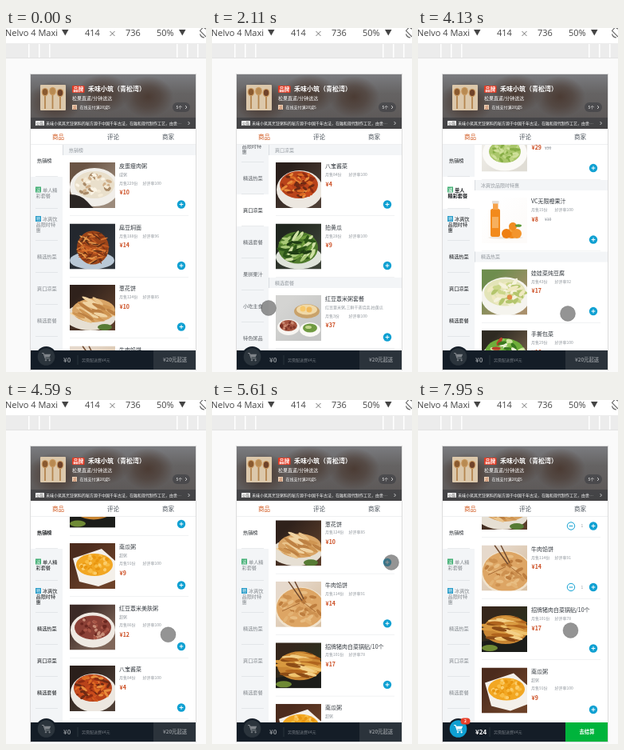
Write an HTML page that moves like this. It is 251 px wide and 430 px high and loops after 8000 ms.

```html
<!DOCTYPE html>
<html>
<head>
<meta charset="utf-8">
<style>
html, body { margin: 0; width: 100%; height: 100%; overflow: hidden; background: #fafafa; }
svg { display: block; width: 251px; height: 430px; }
text { font-family: "Noto Sans CJK SC", "Noto Sans CJK", "Noto Sans", sans-serif; white-space: pre; }
.ui { font-family: "Open Sans", sans-serif; }
</style>
</head>
<body>
<svg id="stage" viewBox="0 0 251 430" xmlns="http://www.w3.org/2000/svg"></svg>
<script>
const LOOP = 8000, TOP = 146, HEAD = 13, ROW = 76.5, SIDE = 40;
const BLUE = '#0fa0d2';
const $ = id => document.getElementById(id);

// ---------- drawing helpers ----------
const text = (x, y, s, size, fill, more = '') =>
  `<text x="${x}" y="${y + size * 0.36}" font-size="${size}" fill="${fill}" ${more}>${s}</text>`;
const rect = (x, y, w, h, fill, more = '') =>
  `<rect x="${x}" y="${y}" width="${w}" height="${h}" fill="${fill}" ${more}/>`;
const circle = (x, y, r, fill, more = '') =>
  `<circle cx="${x}" cy="${y}" r="${r}" fill="${fill}" ${more}/>`;
const oval = ([x, y, rx, ry, fill], more = '') =>
  `<ellipse cx="${x}" cy="${y}" rx="${rx}" ry="${ry}" fill="${fill}" ${more}/>`;
const shape = (d, fill) => `<path d="${d}" fill="${fill}"/>`;
const path = (d, stroke, w, more = '') =>
  `<path d="${d}" fill="none" stroke="${stroke}" stroke-width="${w}" ${more}/>`;
const BOLD = 'font-weight="700"', MID = 'text-anchor="middle"';

function random(seed) {
  return () => {
    seed = (seed * 16807) % 2147483647;
    return seed / 2147483647;
  };
}

// ---------- dishes: backdrop, base (plate), heap, pieces, details on top ----------
const foods = {
  congee: { bg: ['#6a5444', '#9c8b7c'], base: oval([31, 31, 31, 24, '#f1eee9']), heap: [31, 28, 25, 17, '#e9dfcb'],
    bits: ['#cfae88', '#fbf4e6', '#a98a68', '#f4ead6'], n: 34, w: 4, h: 1.8,
    extra: shape('M0 40Q14 40 22 49T30 57H0Z', '#2c2624') },
  noodle: { bg: ['#23272e', '#30363d'], base: oval([28, 46, 28, 11, '#b9c8d6']), heap: [29, 30, 20, 21, '#9c4519'],
    bits: ['#d9742f', '#7f3214', '#e79a4c', '#5d2d17', '#c25a22'], n: 90, w: 7, h: 0.9 },
  pancake: { bg: ['#2f211b', '#5a3d2a'], base: oval([26, 40, 32, 17, '#e6dfd3']) + oval([44, 53, 9, 4, '#577b34']),
    heap: [30, 32, 27, 15, '#d9a566'], bits: ['#eac48c', '#cf9552', '#f0d3a2', '#bd8143'],
    n: 30, w: 13, h: 2.2, tilt: [22, 30] },
  pie: { bg: ['#e6d9cc', '#d9c2a6'], base: oval([31, 34, 32, 27, '#f0e2cc']), heap: [31, 33, 30, 25, '#dda564'],
    bits: ['#cd9150', '#e8bd82', '#bd7d3e', '#e3b273'], n: 44, w: 5, h: 2,
    extra: path('M16 0L33 24M24 0L35 22', '#6f4a30', 1.5) + path('M32 24l18 14M30 27l-22 10', '#a96c35', 1) },
  dumpling: { bg: ['#35261b', '#2a3320'], base: shape('M0 44L57 36V57H0Z', '#1c1d1a') + oval([10, 52, 10, 4, '#6f8a35']),
    heap: [30, 29, 28, 18, '#c98633'], bits: ['#efc36c', '#b0641d', '#f3d088', '#d99a40', '#8c4c16'],
    n: 40, w: 15, h: 2.2, tilt: [8, 24] },
  pumpkin: { bg: ['#4b2b1d', '#6d4229'], base: shape('M4 19L40 7 57 22V46L36 54 12 48Z', '#f4f0ea'),
    heap: [31, 27, 23, 14, '#f2a723'], bits: ['#f9bd45', '#e9960f', '#fbcd6c'], n: 40, w: 3, h: 2 },
  redbean: { bg: ['#3b2a26', '#80675a'], base: oval([29, 32, 28, 22, '#efe9e2']), heap: [29, 29, 23, 15, '#8b4036'],
    bits: ['#6b2820', '#c98f7a', '#a85546'], n: 34, w: 3, h: 1.8 },
  pickle: { bg: ['#2a1f1b', '#4d3e35'], base: oval([30, 34, 29, 24, '#ece7e0']), heap: [29, 28, 24, 17, '#b9431a'],
    bits: ['#dd6a23', '#8e2c12', '#e98d3c', '#c94b1c', '#6e2a14'], n: 60, w: 5, h: 1.6 },
  cucumber: { bg: ['#20261f', '#3d4238'], base: oval([29, 42, 29, 15, '#dfe3da']), heap: [28, 30, 25, 20, '#4f7a2c'],
    bits: ['#2c5518', '#a9c978', '#6f9c3d', '#cfe0a4', '#1f3d14'], n: 56, w: 8, h: 1.9, tilt: [-30, 80] },
  cabbage: { bg: ['#6e8d4e', '#a9906c'], base: oval([30, 34, 31, 24, '#f5f4ee']), heap: [29, 29, 26, 17, '#e3e4b8'],
    bits: ['#cbd68a', '#f5f2dc', '#b3c56c', '#efe9c0'], n: 40, w: 8, h: 2.4,
    extra: circle(35, 35, 3.2, '#df8a45') },
  greens: { bg: ['#2e2a22', '#74604a'], base: oval([29, 36, 30, 22, '#f2f1ec']), heap: [29, 28, 25, 18, '#6fae3a'],
    bits: ['#4c9527', '#cfe3a0', '#8dc456', '#b8402a', '#eef3d6', '#3a7a20'], n: 48, w: 6, h: 2.2 },
  juice: { bg: ['#ffffff', '#fdfbf9'], base: oval([30, 50, 22, 1.6, '#efe6dc']), heap: [38, 45, 8, 6, '#f08a1c'],
    bits: ['#f59a2e', '#f7ad4d'], n: 5, w: 3, h: 2,
    extra: rect(11, 14, 12, 35, '#f28a1c', 'rx="2.5"') + rect(14, 6, 6.5, 9, '#f6a24a') + rect(13, 4, 8.5, 3.5, '#e5dfd8') +
      rect(13, 24, 8, 14, '#f7b05e') + circle(31, 45, 6, '#ee7f12') + circle(44, 45, 6, '#f3952d') +
      circle(39, 36, 5, '#f08c22') + oval([46, 35, 4, 1.8, '#5c9a3a']) },
  salad: { bg: ['#f0eee9', '#e0ddd5'], base: oval([29, 34, 28, 22, '#fbfaf7']), heap: [29, 32, 20, 14, '#a9c66a'],
    bits: ['#cfe09a', '#86ad45', '#bfd684'], n: 36, w: 4, h: 1.6 },
  set: { bg: ['#d4d4d2', '#c6c7c6'], base: oval([16, 40, 14, 10, '#f7f5f1']), heap: [16, 38, 11, 7, '#a5543f'],
    bits: ['#7d3326', '#c98870'], n: 14, w: 2.5, h: 1.6,
    extra: oval([39, 20, 16, 9, '#c9a26a']) + oval([39, 18, 13, 6.5, '#f0d9a8']) + circle(34, 17, 3.5, '#f7c86b') +
      circle(42, 18, 3.5, '#f2b95a') + oval([43, 43, 13, 9, '#faf9f5']) + oval([43, 41, 9, 5.5, '#6f9a41']) +
      oval([41, 40, 4, 2, '#c3d68c']) }
};

function photo(kind, seed) {
  const f = foods[kind], rnd = random(seed * 977 + 31);
  const [hx, hy, rx, ry] = f.heap, [lean, spread] = f.tilt || [0, 120];
  let out = rect(0, 0, 57, 57, `url(#bg-${kind})`) + f.base + oval(f.heap);
  for (let i = 0; i < f.n; i++) {
    const a = rnd() * 6.283, r = Math.sqrt(rnd()) * 0.86, turn = lean + (rnd() - 0.5) * spread;
    const x = hx + Math.cos(a) * r * rx, y = hy + Math.sin(a) * r * ry;
    out += oval([x, y, f.w * (0.6 + rnd() * 0.4), f.h, f.bits[i % f.bits.length]],
      `transform="rotate(${turn} ${x} ${y})"`);
  }
  return `<g clip-path="url(#thumb)"><g filter="url(#soft)">${out}${f.extra || ''}</g></g>`;
}

// ---------- menu: name, sold, rating, price, picture, note, old price ----------
const menu = [
  ['热销榜', [
    ['皮蛋瘦肉粥', 229, 100, 10, 'congee', '咸粥'],
    ['扁豆焖面', 188, 96, 14, 'noodle'],
    ['葱花饼', 124, 85, 10, 'pancake'],
    ['牛肉馅饼', 114, 91, 14, 'pie'],
    ['招牌猪肉白菜锅贴/10个', 101, 78, 17, 'dumpling'],
    ['南瓜粥', 91, 100, 9, 'pumpkin', '甜粥'],
    ['红豆薏米美肤粥', 86, 100, 12, 'redbean', '甜粥'],
    ['八宝酱菜', 84, 100, 4, 'pickle'],
    ['红枣山药糙米粥', 81, 91, 10, 'congee'],
    ['糊塌子', 80, 93, 10, 'pancake']]],
  ['单人精彩套餐', [['红枣山药粥套餐', 17, 100, 29, 'salad', '', 36]]],
  ['冰爽饮品限时特惠', [['VC无限橙果汁', 15, 100, 8, 'juice', '', 10]]],
  ['精选热菜', [
    ['娃娃菜炖豆腐', 43, 92, 17, 'cabbage'],
    ['手撕包菜', 29, 100, 16, 'greens'],
    ['香酥黄金鱼/3条', 15, 100, 11, 'dumpling']]],
  ['爽口凉菜', [['八宝酱菜', 84, 100, 4, 'pickle'], ['拍黄瓜', 28, 100, 9, 'cucumber']]],
  ['精选套餐', [
    ['红豆薏米粥套餐', 3, 100, 37, 'set', '红豆薏米粥,三鲜干蒸烧卖,拍黄瓜'],
    ['皮蛋瘦肉粥套餐', 12, 100, 31, 'set']]],
  ['果拼果汁', []], ['小吃主食', []], ['特色粥品', []]
];
const starts = [];
const picked = { 2: 6450, 3: 6935 };

function row(item, y, id) {
  const [name, sold, rate, price, kind, note, old] = item;
  const d = note ? 10.5 : 0, grey = '#93999f';
  let out = photo(kind, id + 3) + text(62, 4.7, name, 7, '#30363c');
  if (note) out += text(62, 15.3, note, 5, grey);
  out += text(62, 15.2 + d, `月售${sold}份`, 5, grey) + text(91.5, 15.2 + d, `好评率${rate}`, 5, grey) +
    text(62.5, 27.3 + d, '¥' + price, 7, '#cb4a1e', BOLD);
  if (old) out += text(79, 27.3 + d, '¥' + old, 5, grey, 'text-decoration="line-through"');
  if (picked[id]) out += `<g id="minus${id}">${circle(0, 0, 4.7, '#fff', `stroke="${BLUE}"`)}${path('M-2.4 0H2.4', BLUE, 1)}</g>` +
    text(126, 52.5, '1', 5, grey, `id="count${id}" ${MID}`);
  out += circle(140, 52.5, 5.2, BLUE) + path('M137.6 52.5h4.8M140 50.1v4.8', '#fff', 1);
  return `<g transform="translate(80 ${y})">${out}${rect(0, 66.5, 149, 0.5, '#e3e5e7')}</g>`;
}

function buildList() {
  let y = TOP, id = 0, out = '';
  for (const [title, items] of menu) {
    starts.push(y - TOP);
    out += rect(71, y, 167, HEAD, '#f3f5f7') + rect(71, y, 1, HEAD, '#d9dde1') + text(79, y + 6.5, title, 6, '#93999f');
    items.forEach((item, i) => out += row(item, y + HEAD + 9 + i * ROW, id++));
    y += HEAD + items.length * ROW;
  }
  return out;
}

function buildSide() {
  return menu.map(([name], i) => {
    const y = TOP + i * SIDE, c = y + SIDE / 2;
    let out = rect(31, y, 40, SIDE, '#fff', `id="hit${i}" opacity="0"`) + rect(37, y + SIDE - 0.5, 28, 0.5, '#d3d7db');
    if (i === 1 || i === 2) {
      const lines = i === 1 ? ['单人精', '彩套餐'] : ['冰爽饮', '品限时特', '惠'];
      const first = c - 3.5 * (lines.length - 1);
      out += rect(37, first - 4, 7, 7, i === 1 ? '#3fae72' : '#2f9fca') +
        text(40.5, first - 0.5, i === 1 ? '减' : '特', 5, '#fff', MID);
      lines.forEach((s, n) => out += text(n ? 37.5 : 46, first + n * 7, s, 6.2, 'inherit', `id="l${i}${n}"`));
    } else {
      out += text(39, c - 0.3, name, 6.2, 'inherit');
    }
    return `<g id="side${i}">${out.replaceAll('fill="inherit"', '')}</g>`;
  }).join('');
}

const triangle = x => shape(`M${x} 2h8.5l-4.2 7.5z`, '#444');
const toolbar = rect(0, 0, 251, 20, '#fff') + rect(0, 19, 251, 19, '#ececec') +
  [28, 41, 54, 214, 227, 240].map(x => rect(x, 20, 1.5, 17, '#fff')).join('') + rect(0, 37, 251, 1, '#e2e2e2') +
  [[-1, 'Nelvo 4 Maxi'], [99, '414'], [150, '736'], [189, '50%']]
    .map(([x, s]) => text(x, 6.3, s, 11, '#444', 'class="ui"')).join('') +
  triangle(70) + triangle(217) + path('M130.5 4l6 6M136.5 4l-6 6', '#666', 0.9) +
  path('M251 1.2L247.5 -1 243.5 3.5 251 11', '#666', 1.1) + path('M243.5 7.5Q244.5 11.5 249 12', '#666', 1.1);

const avatar = rect(43, 71, 32, 32, '#dcc8ab', 'rx="1"') +
  [[49, 80, '#8a5a30'], [58.5, 79, '#b88a52'], [68, 81, '#70432a']].map(([x, y, c]) =>
    path(`M${x} ${y}V101`, '#b4844f', 1.8) + oval([x, y, 4.4, 5.2, '#c99a62']) + oval([x, y, 3.2, 4, c])).join('');

const cover = rect(31, 58, 207, 68, 'url(#cover)') +
  [[62, 92, 34, 26], [122, 82, 34, 24], [178, 86, 32, 26]].map(o => oval([...o, 'url(#blot)'])).join('');
const header = `<g clip-path="url(#head)">${cover}</g>` + rect(31, 112, 207, 14, '#07111b', 'opacity=".28"') + avatar +
  rect(83, 72, 15.5, 9, '#e23b24', 'rx="1"') + text(90.7, 76.3, '品牌', 6.5, '#fff', `${BOLD} ${MID}`) +
  text(103, 76.5, '禾味小筑（青松湾）', 8, '#fff', BOLD) + text(83, 87.5, '松果直递/分钟送达', 6, '#fff') +
  rect(83, 96, 6, 6, '#ecd2b8') + text(86, 99, '减', 4.5, '#b0603c', MID) + text(92.5, 99, '在线支付满28减5', 5, '#fff') +
  rect(209, 93, 22, 12, '#07111b', 'opacity=".25" rx="6"') + text(213.5, 99, '5个', 5, '#fff') +
  path('M225 97l2 2-2 2', '#fff', 0.7) + rect(37, 116, 11, 6, '#f2f2f2', 'rx=".5"') + text(42.5, 119, '公告', 4.8, '#444', MID) +
  text(50, 119, '禾味小筑其烹饪粥料的秘方源于中国千年古法，在融和现代制作工艺，由世…', 5, '#fff') +
  path('M228.5 117l2 2-2 2', '#fff', 0.7) + rect(31, 126, 207, 20, '#fff') + rect(31, 145.5, 207, 0.5, '#dfe1e3') +
  text(65.5, 136, '商品', 7.5, '#d0561c', MID) + text(134.5, 136, '评论', 7.5, '#4d555d', MID) + text(203.5, 136, '商家', 7.5, '#4d555d', MID);

const footer = rect(31, 403, 207, 24, '#141d27') + rect(185, 403, 53, 24, '#2b333b', 'id="payBox"') +
  text(212, 415, '', 6.3, '#8b9095', `id="pay" ${BOLD} ${MID}`) +
  circle(50.5, 411, 13, '#141d27') + circle(50.5, 411, 10.8, '#2b343c', 'id="cart"') +
  `<g id="trolley" stroke="#80858a" fill="#80858a"><path d="M45 406.5h2l2.3 6.5h6.2" fill="none" stroke-width="1.2"/>
   <path d="M47.8 407.8h8.4l-1.6 3.8h-5.4z" stroke="none"/><circle cx="50" cy="415.3" r=".7"/><circle cx="54.6" cy="415.3" r=".7"/></g>` +
  `<g id="badge">${rect(53.5, 397.5, 12, 8, '#e8402a', 'rx="4"')}${text(59.5, 401.5, '1', 5, '#fff', `id="badgeText" ${BOLD} ${MID}`)}</g>` +
  text(72, 415, '¥0', 8, '#8b9095', `id="total" ${BOLD}`) + rect(89.7, 409, 0.6, 12, '#39424b') +
  text(95, 415, '另需配送费¥4元', 5, '#737a81');

const stop = (at, c, o = 1) => `<stop offset="${at}" stop-color="${c}" stop-opacity="${o}"/>`;
const backdrops = Object.entries(foods).map(([kind, { bg }]) =>
  `<linearGradient id="bg-${kind}" x2="1" y2="1">${stop(0.2, bg[0])}${stop(0.8, bg[1])}</linearGradient>`).join('');

$('stage').innerHTML = `<defs>${backdrops}
  <clipPath id="thumb"><rect width="57" height="57"/></clipPath>
  <clipPath id="head"><rect x="31" y="58" width="207" height="68"/></clipPath>
  <clipPath id="body"><rect x="31" y="146" width="207" height="257"/></clipPath>
  <filter id="soft" x="0" y="0" width="1" height="1"><feGaussianBlur stdDeviation=".5"/></filter>
  <linearGradient id="cover" x2="0" y2="1">${stop(0, '#7b7c80')}${stop(0.35, '#656363')}${stop(1, '#5b5655')}</linearGradient>
  <radialGradient id="blot">${stop(0, '#47352c', 0.85)}${stop(0.5, '#47352c', 0.55)}${stop(1, '#47352c', 0)}</radialGradient></defs>` +
  rect(0, 0, 251, 430, '#fafafa') + toolbar + rect(30.5, 57.5, 208, 370, '#fff', 'stroke="#dcdcdc"') +
  `<g clip-path="url(#body)">${rect(31, 146, 40, 257, '#f3f5f7')}<g id="side">${buildSide()}</g></g>
   <g clip-path="url(#body)"><g id="list">${buildList()}</g></g>` + header + footer +
  circle(0, 0, 4, BLUE, 'id="ball2"') + circle(0, 0, 4, BLUE, 'id="ball3"') +
  circle(0, 0, 9.5, '#585858', 'id="dot" fill-opacity=".64" stroke="#4a4a4a" stroke-opacity=".35" stroke-width=".8"');

// ---------- motion ----------
const clamp = k => Math.max(0, Math.min(1, k));
const span = (t, a, d) => clamp((t - a) / d);
const smooth = k => k * k * (3 - 2 * k);

function bezier(x1, y1, x2, y2) {
  const at = (s, a, b) => 3 * s * (1 - s) ** 2 * a + 3 * s * s * (1 - s) * b + s ** 3;
  return x => {
    let lo = 0, hi = 1;
    for (let i = 0; i < 24; i++) {
      const s = (lo + hi) / 2;
      if (at(s, x1, x2) < x) lo = s; else hi = s;
    }
    return at(lo, y1, y2);
  };
}
const glide = bezier(0.23, 1, 0.32, 1);
const drop = bezier(0.49, -0.29, 0.75, 0.41);

// touch point: time, x, y
const PULL = 3640, RELEASE = 3996;
const touch = [
  [70, 160, 394], [470, 60, 331], [690, 60, 331], [930, 60, 233], [1870, 60, 233], [2110, 71, 350],
  [2190, 71, 350], [2430, 75, 386], [2730, 205, 190], [3050, 205, 190], [PULL, 192, 174],
  [RELEASE, 188, 357], [4130, 188, 357], [4990, 216, 242], [5610, 225, 203], [6390, 222, 209],
  [6470, 222, 209], [6870, 224, 291], [7250, 224, 291], [7600, 191.5, 341], [7950, 191.5, 288]
];
function touchAt(t) {
  let i = 0;
  while (i < touch.length - 2 && t >= touch[i + 1][0]) i++;
  const [a, x, y] = touch[i], [b, u, v] = touch[i + 1];
  const raw = span(t, a, b - a), k = a === PULL ? raw * raw : smooth(raw);
  return [x + (u - x) * k, y + (v - y) * k];
}

function listScroll(t) {
  if (t < PULL) return 1199.5 * glide(span(t, 1520, 300));
  if (t < RELEASE) return 1199.5 - 183.5 * span(t, PULL, RELEASE - PULL) ** 2;
  if (t < 7600) return 1016 - 853 * glide(span(t, RELEASE, 2500));
  return 163 + 53 * smooth(span(t, 7600, 350));
}
function sideScroll(t) {
  if (t < 2190) return 98 * smooth(span(t, 690, 240));
  if (t < 2430) return 98 - 36 * smooth(span(t, 2190, 240));
  return 62 * (1 - glide(span(t, 2430, 450)));
}

const set = (id, attrs) => { for (const k in attrs) $(id).setAttribute(k, attrs[k]); };
const say = (id, s) => { if ($(id).textContent !== s) $(id).textContent = s; };

function draw(t) {
  const y = listScroll(t);
  set('list', { transform: `translate(0 ${-y})` });
  set('side', { transform: `translate(0 ${-sideScroll(t)})` });

  let current = 0;
  starts.forEach((s, i) => { if (i < 6 && y >= s - 0.1) current = i; });
  const dark = t > 2840 && t < 4600;
  const idle = dark ? '#15181b' : t > 1520 && t <= 2840 ? '#5c6166' : '#83888d';
  menu.forEach((_, i) => {
    const on = i === current;
    set('hit' + i, { opacity: on ? 1 : 0 });
    set('side' + i, { fill: on && !dark ? '#23282d' : idle, 'font-weight': on && dark ? 700 : on || dark ? 500 : 400 });
  });
  say('l10', current === 1 ? '单人' : '单人精');
  say('l11', current === 1 ? '精彩套餐' : '彩套餐');

  let count = 0, total = 0;
  for (const id in picked) {
    const k = span(t, picked[id], 400), on = t >= picked[id];
    if (on) { count++; total += menu[0][1][id][3]; }
    set('minus' + id, { opacity: k, transform: `translate(${112 + 12 * (1 - k)} 52.5) rotate(${180 * (1 - k)})` });
    set('count' + id, { opacity: on ? 1 : 0 });
    const from = TOP + HEAD + 9 + ROW * id + 52.5 - 163;
    set('ball' + id, {
      visibility: k > 0 && k < 1 ? 'visible' : 'hidden',
      transform: `translate(${220 - 169 * k} ${from + (411 - from) * drop(k)})`
    });
  }
  const ready = total >= 20;
  set('cart', { fill: count ? BLUE : '#2b343c' });
  set('trolley', { fill: count ? '#fff' : '#80858a', stroke: count ? '#fff' : '#80858a' });
  set('badge', { visibility: count ? 'visible' : 'hidden' });
  say('badgeText', String(count));
  set('total', { fill: count ? '#fff' : '#8b9095' });
  say('total', '¥' + total);
  set('payBox', { fill: ready ? '#00b43c' : '#2b333b' });
  set('pay', { fill: ready ? '#fff' : '#8b9095' });
  say('pay', ready ? '去结算' : total ? `还差${20 - total}元起送` : '¥20元起送');

  const [dx, dy] = touchAt(t);
  set('dot', { cx: dx, cy: dy, visibility: t < 70 ? 'hidden' : 'visible' });
}

const begin = performance.now();
function tick() {
  draw((performance.now() - begin) % LOOP);
  requestAnimationFrame(tick);
}
tick();
</script>
</body>
</html>
```
